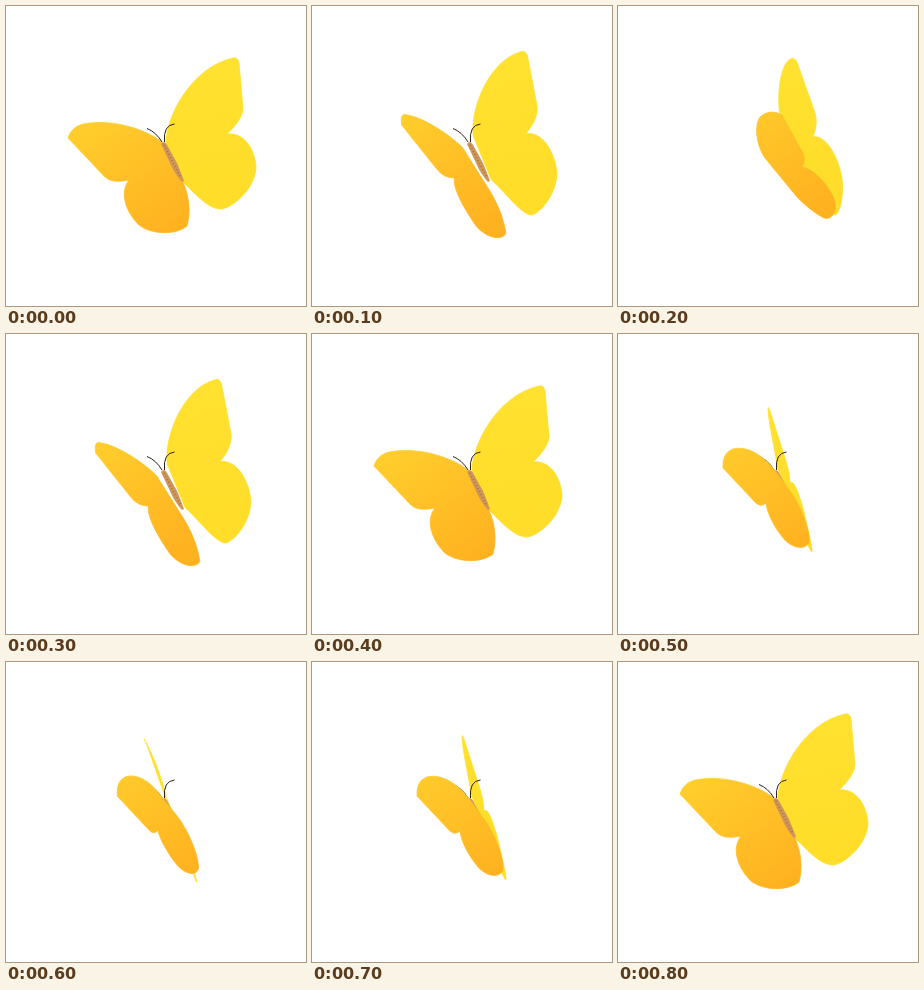
An HTML page for the animation above (900 ms loop, 300 by 300 pixels).

```html
<!DOCTYPE html>
<html lang="en">
<head>
<meta charset="utf-8">
<title>Butterfly</title>
<style>
  html, body { margin: 0; width: 100%; height: 100%; overflow: hidden; background: #fff; }
  svg { display: block; width: 100%; height: 100%; }
  .wing { stroke-width: .8; stroke-linejoin: round; }
</style>
</head>
<body>
<svg id="stage" viewBox="0 0 300 300">
  <defs>
    <linearGradient id="amber" gradientUnits="userSpaceOnUse" x1="80" y1="110" x2="160" y2="225">
      <stop offset="0" stop-color="#ffcf2d"/>
      <stop offset="1" stop-color="#ffb220"/>
    </linearGradient>
    <linearGradient id="lemon" gradientUnits="userSpaceOnUse" x1="190" y1="60" x2="215" y2="200">
      <stop offset="0" stop-color="#ffe12f"/>
      <stop offset="1" stop-color="#ffdd29"/>
    </linearGradient>
  </defs>
  <path id="right" class="wing" fill="url(#lemon)" stroke="url(#lemon)"/>
  <g id="body">
    <path d="M155 138Q157.500 134 160.500 138L171 157Q175.500 168 178 175L176 176Q168 167 164 157Z" fill="#cf965a"/>
    <path d="M158 139L175 172" fill="none" stroke="#8f5f35" stroke-width="2" stroke-dasharray="1 2.4" opacity=".6"/>
    <path d="M156 136Q150 126 141 122.500M158.500 136Q157 119 168.500 118" fill="none" stroke="#2b2115" stroke-width="1"/>
  </g>
  <path id="left" class="wing" fill="url(#amber)" stroke="url(#amber)"/>
</svg>
<script>
const STEP = 100;
const stage = document.getElementById('stage');
const left = document.getElementById('left');
const right = document.getElementById('right');
const body = document.getElementById('body');

// Every outline shares one command order, so poses can be blended.
const LEFT = {
  flat: 'M157 137 C142 124 110 114 84 117 Q66 118 62 132 L98 170 Q105 178 123 174 C113 187 120 206 133 219 C146 229 170 229 181 220 C185 205 183 190 177 176 Z',
  up: 'M147 152 C140 142 135 122 142 111 Q152 102 164 109 L185 147 Q188 154 184 161 C196 163 212 180 217 196 C219 207 213 214 206 212 C196 207 187 199 179 191 Z',
  down: 'M158 138 C148 124 131 111 115 115 Q104 119 105 134 L137 168 Q142 174 148 169 C149 180 158 196 167 206 C176 215 188 216 191 208 C192 196 183 172 172 157 Z'
};
const RIGHT = {
  flat: 'M160 137 C160 110 186 61 227 52 Q232 51 233 57 L237 102 Q237 113 221 128 C240 126 250 147 250 163 C247 187 223 203 215 203 C203 203 190 189 178 177 Z',
  up: 'M165 122 C157 98 161 62 171 54 Q176 50 179 56 L196 104 Q201 116 195 131 C206 128 220 148 224 172 C226 190 222 208 217 209 C210 205 190 170 180 165 Z',
  down: 'M160 135 C156 112 150 85 150 74 Q150 72 152 77 L168 127 Q172 140 172 149 C176 145 181 160 185 174 C189 192 194 210 194 218 C191 216 182 192 174 168 Z'
};

// Blend two outlines, then spread the result from the body.
function blend(a, b, k, spread) {
  const to = b.match(/\d+/g);
  let i = 0;
  return a.replace(/\d+/g, n => {
    const centre = i % 2 ? 150 : 170;
    const v = +n + (to[i++] - n) * k;
    return (centre + (v - centre) * spread).toFixed(1);
  });
}

const flat = { to: 'up', k: 0, spread: [1, 1] };
const rise = { to: 'up', k: 0.38, spread: [1.16, 1.07] };
const high = { to: 'up', k: 1, spread: [1, 1] };
const sink = { to: 'down', k: 1, spread: [1, 1] };
const low = { to: 'down', k: 1.15, spread: [1, 1] };
const flap = [flat, rise, high, rise, flat, sink, low, sink, flat];

function draw(ms) {
  const pose = flap[Math.floor(ms / STEP) % flap.length];
  const { to, k, spread } = pose;
  left.setAttribute('d', blend(LEFT.flat, LEFT[to], k, spread[0]));
  right.setAttribute('d', blend(RIGHT.flat, RIGHT[to], k, spread[1]));
  stage.insertBefore(body, pose === flat ? null : left);
  body.style.display = pose === high ? 'none' : '';
}

let start;
function tick(now) {
  start ??= now;
  draw(now - start);
  requestAnimationFrame(tick);
}
draw(0);
requestAnimationFrame(tick);
</script>
</body>
</html>
```
